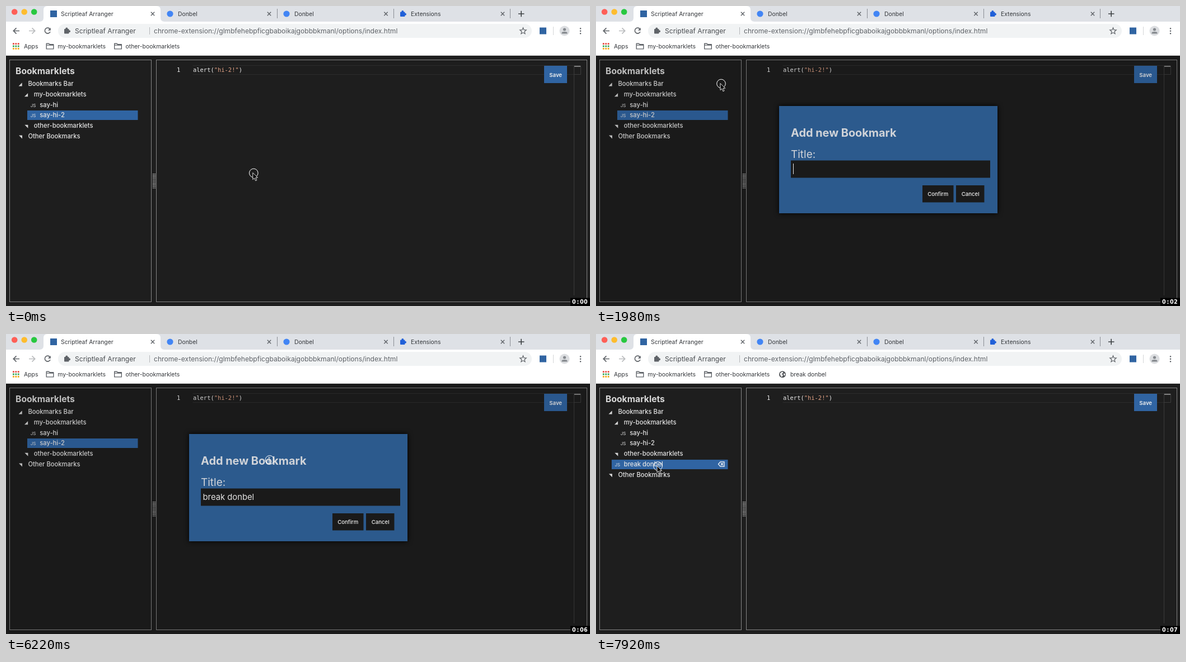
An HTML page that plays this animation: 1043 px wide and 537 px high, repeating every 8000 ms.

```html
<!DOCTYPE html>
<html lang="en">
<head>
<meta charset="utf-8">
<title>Adding a bookmarklet</title>
<style>
  html, body { margin: 0; width: 100%; height: 100%; overflow: hidden; background: #1e1e1e; }
  svg { display: block; width: 100%; height: 100%; }
  text { font-family: Inter, sans-serif; white-space: pre; }
  .small { font-size: 10.4px; fill: #35383c; }
  .url { font-size: 12.08px; fill: #5f6368; }
  .row { font-size: 11.2px; font-weight: 500; fill: #e4e4e4; }
  .js { font-size: 8px; fill: #e0e0e0; }
  .button { font-size: 9.6px; font-weight: 500; fill: #f0f0f0; text-anchor: middle; }
  .code { font: 10.45px "DejaVu Sans Mono", monospace; fill: #ececec; }
  .timer { font: bold 9.6px "DejaVu Sans", sans-serif; fill: #fff; }
  .line { fill: none; stroke: #5f6368; stroke-width: 1.4; }
  .pane { fill: none; stroke: #858585; }
  .blue { fill: #3064a2; }
</style>
</head>
<body>
<svg viewBox="0 0 1043 537">
  <defs>
    <path id="close" class="line" d="M-3.2-3.2 3.2 3.2M3.2-3.2-3.2 3.2"/>
    <path id="folder" class="line" stroke-linejoin="round" d="M.7.7H5L6.5 2.3H13.3V10.4H.7ZM.7 3.6H13.3"/>
    <g id="puzzle"><rect x="-5" y="-3" width="8.5" height="8.5" rx="1"/><circle cx="-.7" cy="-3.6" r="2"/><circle cx="4" cy="1.2" r="2"/></g>
  </defs>

  <!-- Tab strip -->
  <path fill="#dee1e6" d="M0 0H1043V29H0Z"/>
  <path fill="#fff" d="M0 28H60Q67 28 67 21V7Q67 0 74 0H269Q276 0 276 7V21Q276 28 283 28H1043V88H0Z"/>
  <circle cx="15.2" cy="10.5" r="5.3" fill="#ff5f57"/>
  <circle cx="32.7" cy="10.5" r="5.3" fill="#febc2e"/>
  <circle cx="50.2" cy="10.5" r="5.3" fill="#28c840"/>
  <rect class="blue" x="79" y="8" width="12" height="12"/>
  <circle cx="293" cy="14" r="5.6" fill="#4285f4"/>
  <circle cx="501" cy="14" r="5.6" fill="#4285f4"/>
  <use href="#puzzle" x="709" y="13.5" fill="#2160d8"/>
  <text class="small" x="98" y="17.7">Scriptleaf Arranger</text>
  <text class="small" x="307" y="17.7">Donbel</text>
  <text class="small" x="515" y="17.7">Donbel</text>
  <text class="small" x="723" y="17.7">Extensions</text>
  <use href="#close" x="262" y="14"/><use href="#close" x="470" y="14"/>
  <use href="#close" x="678.5" y="14"/><use href="#close" x="887" y="14"/>
  <path stroke="#8a8e94" d="M484.5 5V22M692.5 5V22M900.5 5V22"/>
  <path class="line" style="stroke:#3c4043;stroke-width:1.6" d="M915 14H925.5M920.2 8.8V19.2"/>

  <!-- Toolbar -->
  <rect x="93" y="32" width="846" height="25" rx="12.5" fill="#f1f3f4"/>
  <path class="line" style="stroke-width:1.7" d="M24 44.5H13.5M18.5 39.3 13.3 44.5 18.5 49.7"/>
  <path class="line" style="stroke-width:1.7;stroke:#babcbe" d="M41 44.5H51.5M46.5 39.3 51.7 44.5 46.5 49.7"/>
  <path class="line" style="stroke-width:1.7" d="M78.3 41A5 5 0 1 0 79 46"/>
  <path fill="#5f6368" d="M79.8 38.7V43.7H74.8Z"/>
  <use href="#puzzle" x="109" y="44" fill="#5f6368"/>
  <text class="url" x="123" y="48.7" style="fill:#4a4d51">Scriptleaf Arranger</text>
  <path stroke="#b4b7ba" d="M256.5 38V51"/>
  <text class="url" x="264" y="48.7">chrome-extension://glmbfehebpficgbaboikajgobbbkmanl/options/index.html</text>
  <path class="line" style="stroke-width:1.2" d="M923.5 38.8 925 42.7 929.2 43 926 45.7 927 49.8 923.5 47.6 920 49.8 921 45.7 917.8 43 922 42.7Z"/>
  <rect class="blue" x="953" y="38.5" width="12" height="12"/>
  <path stroke="#d3d5d8" d="M977.5 37V52"/>
  <circle cx="997.5" cy="44.5" r="9" fill="#dcdee1"/>
  <path fill="#85898e" d="M992.5 49.5V48Q992.5 46 997.5 46T1002.5 48V49.5Z"/>
  <circle cx="997.5" cy="42" r="2.6" fill="#85898e"/>
  <path stroke="#5f6368" stroke-width="2.6" stroke-linecap="round" d="M1026 40.2h.01M1026 44.7h.01M1026 49.2h.01"/>

  <!-- Bookmarks bar -->
  <g stroke-width="2.8" stroke-dasharray="2.8 1.6">
    <path stroke="#e8453c" d="M12 67.6H24"/><path stroke="#3aa757" d="M12 72H24"/><path stroke="#f2a60c" d="M12 76.4H24"/>
  </g>
  <text class="small" x="32" y="75.8">Apps</text>
  <use href="#folder" x="71.5" y="66.5"/><text class="small" x="92.3" y="75.8">my-bookmarklets</text>
  <use href="#folder" x="193" y="66.5"/><text class="small" x="213.5" y="75.8">other-bookmarklets</text>
  <g id="newBookmark">
    <circle cx="333" cy="72.3" r="6" fill="#505357"/>
    <path fill="#fff" d="M328.5 71Q330 68 333 67.5L334.5 69.5 331.5 71.5 334 73.5 332 77Q329 75 328.5 71ZM336 70 338 72 336.5 75 335 72.5Z"/>
    <text class="small" x="347" y="75.8">break donbel</text>
  </g>

  <!-- Page -->
  <path fill="#dcdcdc" d="M0 88H1043V89H0Z"/>
  <path fill="#1e1e1e" d="M0 89H1043V537H0Z"/>
  <rect class="pane" x="6.5" y="96.5" width="253" height="433"/>
  <rect class="pane" x="268.5" y="96.5" width="769" height="433"/>
  <path stroke="#d0d0d0" stroke-width="1.6" stroke-dasharray="1.6 1.2" d="M263 300V326.5M266 300V326.5"/>
  <text x="17" y="122" font-size="15.7" font-weight="700" fill="#d8d8d8">Bookmarklets</text>
  <g id="tree"></g>
  <path fill="none" stroke="#2d2d2d" d="M333.5 106.5H1026M333.5 122.5H1026"/>
  <path fill="none" stroke="#3c3c3c" d="M1014.5 107V518M1026.5 107V122.5H1015"/>
  <path stroke="#a0a0a0" stroke-width="1.5" d="M1015 108H1026"/>
  <text class="code" x="305" y="118.4">1</text>
  <text class="code" x="334" y="118.4">alert(<tspan fill="#e0a084">"hi-2!"</tspan>)</text>
  <rect class="blue" x="961" y="107" width="41" height="31"/>
  <text class="button" x="981.7" y="126.5" style="font-weight:600">Save</text>

  <g id="dialog">
    <path fill="#000" fill-opacity=".12" d="M0 89H1043V537H0Z"/>
    <rect x="327" y="179" width="390" height="192" fill="#2c5a8d" style="filter:drop-shadow(0 0 5px #000)"/>
    <text x="348" y="233.5" font-size="19.9" font-weight="700" fill="#d0d3d8">Add new Bookmark</text>
    <text x="348" y="272" font-size="19" fill="#d0d3d8">Title:</text>
    <rect x="348" y="276.5" width="356" height="31" fill="#1a1a1a"/>
    <text id="input" x="351.5" y="297.3" font-size="14.8" fill="#e2e2e2"></text>
    <rect id="caret" y="282" width="1" height="19" fill="#e8e8e8"/>
    <path fill="#1a1a1a" d="M583 321H638.5V351.5H583ZM643 321H693.5V351.5H643Z"/>
    <text class="button" x="610.7" y="340">Confirm</text>
    <text class="button" x="668.7" y="340">Cancel</text>
  </g>

  <path fill="#000" d="M1008 522.5H1043V537H1008Z"/>
  <text id="timer" class="timer" x="1011 1019.5 1025 1032" y="533"></text>

  <g id="cursor">
    <circle r="7.8" fill="none" stroke="#fff"/>
    <path id="arrow" transform="translate(-1.5 -.5)" fill="#000" stroke="#fff" stroke-width=".9" d="M0 0V12L2.8 9.4 4.9 14.2 7 13.3 4.9 8.7H8.7Z"/>
    <path id="beam" transform="translate(-1 .5)" fill="none" stroke="#e8e8e8" d="M-2-5.5Q0-5.500 0-4V4Q0 5.500-2 5.500M2-5.500Q0-5.500 0-4M0 4Q0 5.500 2 5.500M-1.500 1.500H1.500"/>
  </g>
</svg>
<script>
const LOOP = 8000, OPEN = 1980, CLOSE = 6920, BLINK = 520;
const FIRST_ROW = 139, ROW_STEP = 18.8, INDENT = 10.4, TREE_RIGHT = 235.5;
const TITLE = "break donbel";
const keyTimes = [3310, 3490, 3670, 3790, 4150, 4260, 4500, 4680, 4800, 4920, 5100, 5200];

const before = [
  ["Bookmarks Bar", 0, "open"], ["my-bookmarklets", 1, "open"],
  ["say-hi", 2, "js"], ["say-hi-2", 2, "js"],
  ["other-bookmarklets", 1, "closed"], ["Other Bookmarks", 0, "closed"]
];
const after = [...before.slice(0, 5), [TITLE, 1, "js"], before[5]];

const easeIn = p => p * p;
const easeOut = p => 1 - (1 - p) ** 2;
const easeInOut = p => p * p * (3 - 2 * p);

// Each move: start, end, from, to, easing
const moves = [
  [390, 1230, [442.3, 299], [181, 135], easeInOut],
  [1240, 1560, [181, 135], [223.5, 139], easeInOut],
  [2450, 2720, [223.5, 139], [337.5, 215], easeInOut],
  [5960, 6220, [337.5, 215], [470.5, 225], easeIn],
  [6220, 6800, [470.5, 225], [596.3, 331.5], easeOut],
  [7180, 7920, [596.3, 331.5], [110.5, 236.5], easeInOut]
];

const el = id => document.getElementById(id);
const show = (id, on) => el(id).setAttribute("display", on ? "inline" : "none");

function cursorAt(t) {
  const [start, end, from, to, ease] = moves.findLast(m => t >= m[0]) || moves[0];
  const p = ease(Math.min(1, Math.max(0, (t - start) / (end - start))));
  return from.map((a, i) => a + (to[i] - a) * p);
}

function rowMarkup([label, depth, kind], i, selected, hovered) {
  const y = FIRST_ROW + i * ROW_STEP, shift = depth * INDENT;
  const left = Math.round(17.5 + shift), top = Math.round(y - 8);
  let out = "";
  if (selected || hovered)
    out += `<rect x="${left}" y="${top}" width="${TREE_RIGHT - left}" height="17" fill="${selected ? "#3064a2" : "#23303d"}"/>`;
  const x = 23 + shift;
  if (kind === "js") out += `<text class="js" x="${x}" y="${y + 4}">JS</text>`;
  else out += `<path fill="#d4d4d4" d="${kind === "open"
    ? `M${x - .5} ${y + 4.5}h6.2v-6.2Z` : `M${x} ${y - 1.5}h6v6Z`}"/>`;
  out += `<text class="row" x="${39.4 + shift}" y="${y + 3.9}">${label}</text>`;
  if (hovered) out += kind === "js"
    ? `<path fill="none" stroke="#fff" stroke-width="1.2" d="M218.5 ${y}l3.5-4.2h7v8.4h-7ZM223 ${y - 2}l4 4m0-4l-4 4"/>`
    : `<rect class="blue" x="215" y="${top}" width="20.5" height="17"/><path stroke="#fff" stroke-width="1.3" d="M221 ${y + .5}h8m-4-4v8"/>`;
  return out;
}

function drawTree(t, x, y, modal) {
  const rows = t < CLOSE ? before : after;
  const selected = t < CLOSE ? 3 : 5;
  const row = Math.round((y - FIRST_ROW) / ROW_STEP);
  const inside = !modal && rows[row] && x < TREE_RIGHT && x > 17.5 + rows[row][1] * INDENT;
  const markup = rows.map((r, i) => rowMarkup(r, i, i === selected, inside && i === row)).join("");
  if (markup !== drawTree.last) el("tree").innerHTML = drawTree.last = markup;
}

function drawInput(t) {
  const typed = keyTimes.filter(k => t >= k).length;
  const input = el("input");
  input.textContent = TITLE.slice(0, typed);
  el("caret").setAttribute("x", 352 + (typed ? input.getComputedTextLength() : 0));
  const since = t - (typed ? keyTimes[typed - 1] : OPEN);
  show("caret", since % (2 * BLINK) < BLINK);
}

function draw(t) {
  const modal = t >= OPEN && t < CLOSE;
  const [x, y] = cursorAt(t);
  show("dialog", modal);
  show("newBookmark", t >= CLOSE);
  drawTree(t, x, y, modal);
  if (modal) drawInput(t);
  const overText = modal && x > 348 && x < 537 && y < 276;
  const overEditor = t >= CLOSE && x > 268;
  show("beam", overText || overEditor);
  show("arrow", !overText && !overEditor);
  el("cursor").setAttribute("transform", `translate(${x} ${y})`);
  el("timer").textContent = "0:0" + Math.floor((t + 30) / 1000) % 8;
}

const began = performance.now();
function tick() {
  draw((performance.now() - began) % LOOP);
  requestAnimationFrame(tick);
}
tick();
</script>
</body>
</html>
```
